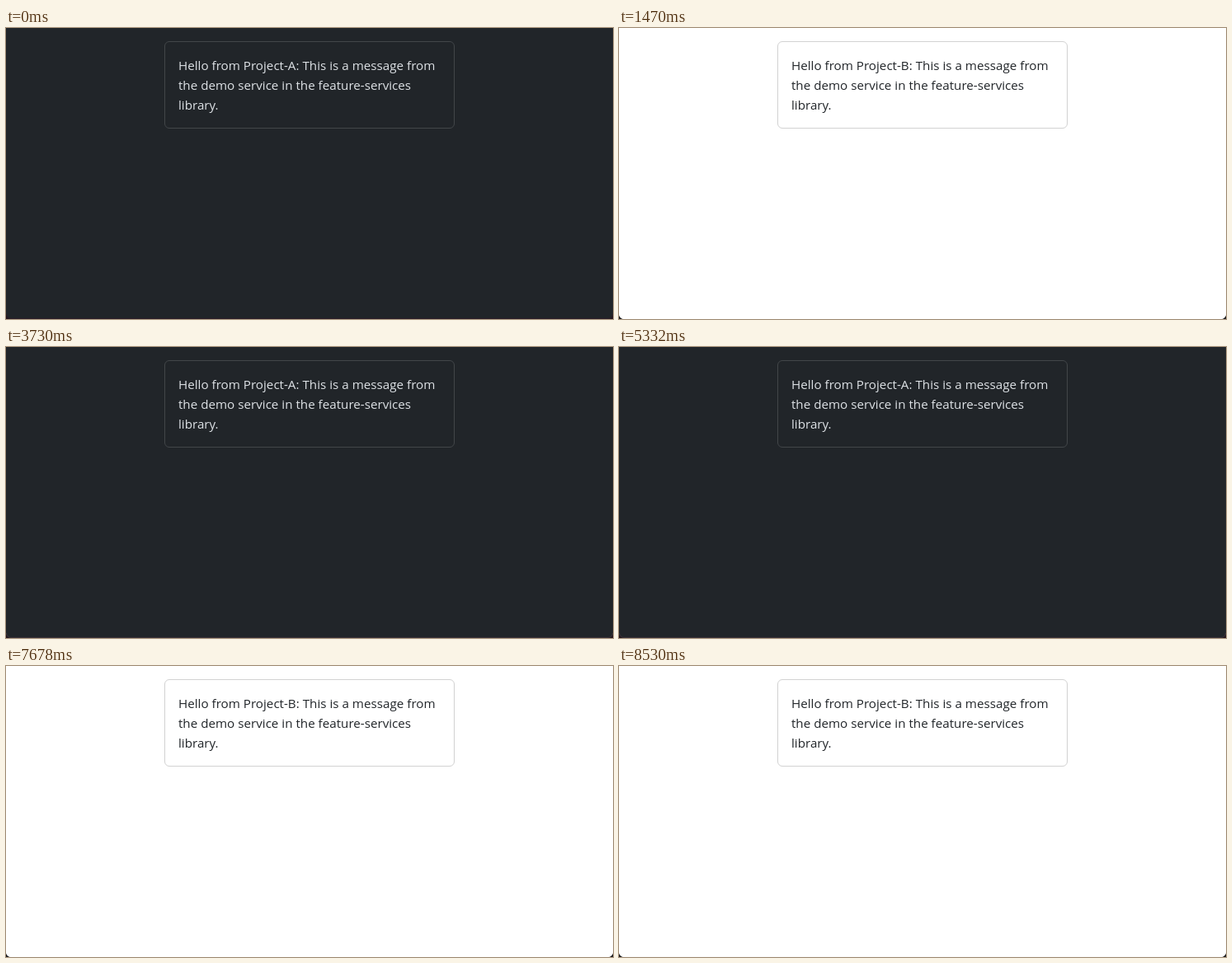
These frames come from a looping animation (736x353 px, 9070 ms). An HTML page:

```html
<!DOCTYPE html>
<html lang="en">
<head>
<meta charset="utf-8">
<title>Two projects, one service</title>
<style>
  html, body { margin: 0; width: 100%; height: 100%; overflow: hidden; }
  svg { display: block; width: 100vw; height: 100vh; }
  text { font: 15.2px "Open Sans", "Noto Sans", sans-serif; white-space: pre; }
</style>
</head>
<body>
<svg viewBox="0 0 736 353">
  <rect id="desk" width="736" height="353"/>
  <path id="pane" d="M0 0H736V347A6 6 0 0 1 730 353H6A6 6 0 0 1 0 347Z"/>
  <path id="edge" d="M0.5 347A5.5 5.5 0 0 0 6 352.5H730A5.5 5.5 0 0 0 735.5 347" fill="none"/>
  <rect id="card" x="192.5" y="16.5" width="351" height="105" rx="5.5" fill="none"/>
  <g id="copy">
    <text id="greeting" x="209" y="51"></text>
    <text x="209" y="75">the demo service in the feature-services</text>
    <text x="209" y="99">library.</text>
  </g>
</svg>
<script>
  const LOOP = 9070;
  const $ = id => document.getElementById(id);

  const dark = { name: "A", pane: "#212529", text: "#dee2e6", card: "#424649", desk: "#24151d" };
  const light = { name: "B", pane: "#ffffff", text: "#212529", card: "#d2d2d2", desk: "#1c1c1f" };

  // Each scene lasts until its end time.
  const scenes = [
    { end: 1470, theme: dark, edge: "#2b1c25" },
    { end: 3730, theme: light, edge: "#ffffff" },
    { end: 6400, theme: dark, edge: "#3b3238" },
    { end: 8530, theme: light, edge: "#ffffff" },
    { end: LOOP, theme: light, edge: "#fcfcfc" }
  ];

  let shown;

  function draw(time) {
    const scene = scenes.find(s => time < s.end);
    if (scene === shown) return;
    shown = scene;
    const { theme, edge } = scene;
    $("desk").setAttribute("fill", theme.desk);
    $("pane").setAttribute("fill", theme.pane);
    $("edge").setAttribute("stroke", edge);
    $("card").setAttribute("stroke", theme.card);
    $("copy").setAttribute("fill", theme.text);
    $("greeting").textContent = `Hello from Project-${theme.name}: This is a message from`;
  }

  const start = performance.now();

  function tick() {
    draw((performance.now() - start) % LOOP);
    requestAnimationFrame(tick);
  }
  tick();
</script>
</body>
</html>
```
